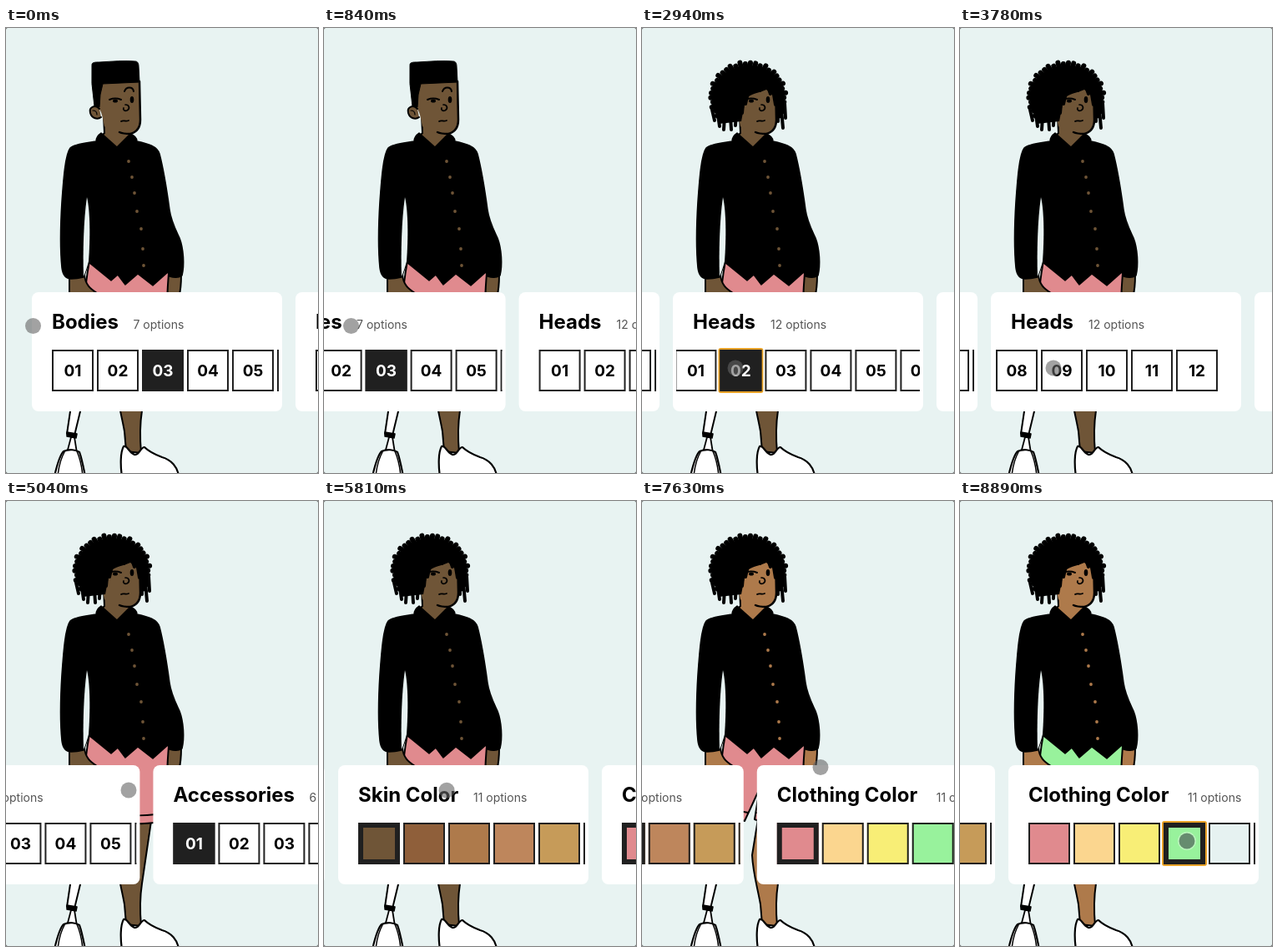
Animation of 374 by 534 pixels, one loop 8.96 s. Source, as an HTML page with a canvas:

```html
<!DOCTYPE html>
<html lang="en">
<head>
<meta charset="utf-8">
<title>Character builder</title>
<style>
  html, body { margin: 0; width: 100%; height: 100%; overflow: hidden; background: #e8f3f2; }
  canvas { display: block; width: 374px; height: 534px; }
</style>
</head>
<body>
<canvas id="stage"></canvas>
<script>
const W = 374, H = 534, LOOP = 8960;
const BG = '#e8f3f2', INK = '#202020', FONT = 'Inter, "Open Sans", sans-serif';
const HEAD_CLICK = 2450, SKIN_CLICK = 6230, CLOTH_CLICK = 8400;

const SKINS = ['#6f5537', '#8f5f3a', '#ae7a4b', '#be865c', '#c69b59', '#d5ad78',
  '#e0b990', '#e8c8a4', '#efd5b8', '#f4e0cb', '#f9ecdf'];
const CLOTHES = ['#e08a8e', '#fbd68f', '#f8ee76', '#98f29c', '#e6f2f1', '#9cc9f2',
  '#b6a4ec', '#e9a5dc', '#d9d9d9', '#777777', '#ffffff'];

const canvas = document.getElementById('stage');
const ctx = canvas.getContext('2d');
const scale = window.devicePixelRatio || 1;
canvas.width = W * scale;
canvas.height = H * scale;

// Timing: each key is [start, end, value reached at end]
const smooth = u => u * u * (3 - 2 * u);
const glide = u => smooth(1 - (1 - u) ** 1.6);
function track(t, from, keys, ease) {
  let value = from;
  for (const [start, end, to] of keys) {
    const u = Math.min(1, Math.max(0, (t - start) / (end - start)));
    value += (to - value) * ease(u);
  }
  return value;
}
const pageScroll = t => track(t, 0, [[350, 2100, 310], [4873, 5603, 962], [7203, 8103, 1237]], glide);
const headScroll = t => track(t, 0, [[2870, 3650, 396], [3800, 4500, 0]], glide);
const pointerX = t => track(t, 32.5, [[2170, 2440, 136], [2560, 2740, 112], [4450, 4780, 147],
  [5800, 6180, 174], [6510, 6950, 214], [8060, 8300, 272]], smooth);
const pointerY = t => track(t, 357.5, [[2170, 2440, 408], [4450, 4780, 347],
  [5800, 6180, 408], [6510, 6950, 319.5], [8060, 8300, 408]], smooth);

// Drawing helpers
function shape(d, fill, line, width = 2) {
  const path = new Path2D(d);
  if (fill) { ctx.fillStyle = fill; ctx.fill(path); }
  if (line) { ctx.strokeStyle = line; ctx.lineWidth = width; ctx.stroke(path); }
}
function box(x, y, w, h, r, fill) {
  ctx.fillStyle = fill;
  ctx.beginPath();
  ctx.roundRect(x, y, w, h, r);
  ctx.fill();
}
function frame(x, y, size, width, color) {
  ctx.strokeStyle = color;
  ctx.lineWidth = width;
  ctx.strokeRect(x + width / 2, y + width / 2, size - width, size - width);
}
function dot(x, y, r, fill) {
  ctx.fillStyle = fill;
  ctx.beginPath();
  ctx.arc(x, y, r, 0, Math.PI * 2);
  ctx.fill();
}
function text(str, x, y, font, color, align = 'left') {
  ctx.font = `${font} ${FONT}`;
  ctx.textAlign = align;
  ctx.fillStyle = color;
  ctx.fillText(str, x, y);
}

function drawLegs(skin, cloth) {
  // artificial leg
  shape('M98 385 L77 460 L73 487 L82 489 L89 460 L119 385Z', '#fff', '#000');
  shape('M78 491 L73 510 H85 L82 491Z', '#fff', '#000', 1.8);
  shape('M73 485 L85 487 L84 492 L73 490Z', '#000', '#000', 1.5);
  shape('M58 538 C61 525 64 513 69 508 C76 505 84 506 88 509 C91 517 93 528 95 538Z', '#fff', '#000', 2.2);
  shape('M70 509 C65 518 63 528 62 538 M85 508 C89 517 91 527 92 538', null, '#000', 1.5);
  // natural leg
  shape('M139 382 L132 425 C133 446 138 462 142 484 L144 508 L162 510 C160 488 161 472 163 459 L174 384Z', skin, '#000');
  shape('M139 538 C137 525 137 509 141 502 C145 500 147 509 154 512 C160 513 161 503 166 503 C171 508 179 512 187 515 C198 518 206 527 207 538Z', '#fff', '#000', 2.2);
  // shorts
  shape('M101 276 C95 300 93 340 91 376 L123 384 L141 345 L135 382 C148 388 163 388 178 386 C189 360 198 325 196 278Z', cloth, '#000');
  shape('M92 367 L127 374 M137 374 C149 379 164 378 180 376', null, '#000', 1.8);
}

function drawBody(skin) {
  // hands and neck
  shape('M76 296 V336 C84 344 98 336 109 318 C101 313 95 308 94 296Z', skin, '#000');
  shape('M195 294 C194 312 191 330 198 337 C207 335 210 314 210 296Z', skin, '#000');
  shape('M117 106 L118 126 L110 134 L132 148 L151 130 L147 112Z', skin, '#000');
  // shirt
  shape('M114 126 C111 128 108 131 108 136 C97 138 82 139 77 144 C71 152 69 180 67 208 C65 240 65 268 67 288' +
    ' C68 296 71 301 78 301 C84 301 89 300 93 299 C95 293 98 287 99 281 L126 303 L134 296 L143 308 L158 295 L176 309 L194 293' +
    ' L196 298 C202 300 207 300 211 297 C214 285 213 265 208 252 C203 241 198 232 196 218 C193 196 190 174 184 151' +
    ' C181 142 171 139 157 136 C157 132 154 129 149 127 L133 143 Z', '#000', '#000', 1.5);
  shape('M97 203 C101 220 101 252 99 280 C97 288 95 293 93 298 C92 270 93 230 97 203Z', BG);
  for (const [x, y] of [[147, 160], [151, 179], [154, 198], [157, 220], [162, 241], [164, 265], [165, 285]])
    dot(x, y, 1.9, skin);
}

function drawFace(skin, ear) {
  shape('M106 66 L107 94 C114 94 116 108 118 118 C128 126 138 128 149 127 C157 125 161 119 161 110 L160 64Z', skin);
  shape('M136 125 C140 127 145 127 149 127 C157 125 161 119 161 110 L160 64', null, '#000', 2.5);
  if (ear) {
    shape('M112 97 C107 91 99 95 101 102 C103 109 110 110 114 107', skin, '#000');
    shape('M104 99 C108 99 109 102 109 104', null, '#000', 1.2);
  }
  shape('M124 86 C129 84 133 84 138 86 M142 76 C144 70 152 70 153 76', null, '#000', 2);
  shape('M143 92 C148 92 149 97 145 99 C142 100 140 98 141 96', null, '#000', 1.7);
  shape('M138 112 C141 110 143 113 147 111', null, '#000', 1.8);
  ctx.fillStyle = '#000';
  for (const [x, y, rx, ry] of [[131, 87.5, 3, 2], [151, 86, 2.3, 4]]) {
    ctx.beginPath();
    ctx.ellipse(x, y, rx, ry, 0, 0, Math.PI * 2);
    ctx.fill();
  }
}

function drawFlatTop() {
  shape('M103 44 C103 41 107 41 112 41 C128 40 142 39 155 40 C158 40 159 43 159 46 L160 65 L116 67 L113 80 L112 95 L106 94 L103 67Z', '#000', '#000', 1);
}

function drawCurlsBehind() {
  for (let i = 0; i < 34; i++) {
    const a = 2.4 + i * 0.14, stretch = 1 + 0.035 * Math.sin(i * 2.6);
    const x = 127 + 44 * stretch * Math.cos(a), y = 82 + 40 * stretch * Math.sin(a);
    shape(`M127 82 L${x} ${y}`, null, '#000', 6);
  }
}

function drawCurlsFront() {
  shape('M84 92 C83 58 108 45 130 45 C154 45 171 64 171 102 L163 108 L160 86 C157 80 153 76 149 74' +
    ' C141 78 130 78 124 86 L119 112 L92 115Z', '#000');
  const locks = [[84, 98, 87, 111], [91, 104, 93, 118], [99, 106, 98, 122], [106, 106, 107, 122],
    [113, 100, 112, 117], [122, 80, 120, 102], [128, 74, 124, 91], [150, 68, 154, 79],
    [157, 74, 160, 92], [163, 90, 163, 112], [167, 98, 169, 120], [171, 90, 172, 108]];
  locks.forEach(([x1, y1, x2, y2]) => shape(`M${x1} ${y1} L${x2} ${y2}`, null, '#000', 4));
}

function drawFigure(t) {
  const skin = SKINS[t < SKIN_CLICK ? 0 : 2];
  const cloth = CLOTHES[t < CLOTH_CLICK ? 0 : 3];
  const curly = t >= HEAD_CLICK;
  ctx.lineCap = ctx.lineJoin = 'round';
  drawLegs(skin, cloth);
  if (curly) drawCurlsBehind();
  drawBody(skin);
  drawFace(skin, !curly);
  if (curly) drawCurlsFront(); else drawFlatTop();
  ctx.lineCap = 'butt';
  ctx.lineJoin = 'miter';
}

function drawCard(x, card) {
  box(x, 317, 300, 143, 8, '#fff');
  text(card.title, x + 24, 361, '700 24px', '#000');
  text(`${card.count} options`, x + card.labelX, 361, '400 14px', '#555');
  ctx.save();
  ctx.beginPath();
  ctx.rect(x + 4, 376, 292, 72);
  ctx.clip();
  for (let i = 0; i < card.count; i++) {
    const bx = x + 24 + 54 * i - (card.scroll || 0), by = 386;
    const on = i === card.selected;
    if (on && card.focus) box(bx - 2, by - 2, 54, 54, 3, '#e9a227');
    box(bx, by, 50, 50, 0, card.colors ? card.colors[i] : on ? INK : '#fff');
    frame(bx, by, 50, on && card.colors ? 6 : 2, INK);
    if (!card.colors)
      text(String(i + 1).padStart(2, '0'), bx + 25, 418, '700 19px', on ? '#fff' : '#000', 'center');
  }
  ctx.restore();
}

function drawPointer(t) {
  const x = pointerX(t), y = pointerY(t);
  const pressed = [[HEAD_CLICK, 2560], [SKIN_CLICK, 6380], [CLOTH_CLICK, LOOP]].some(([a, b]) => t >= a && t < b);
  if (pressed) dot(x, y, 11, 'rgba(255,255,255,.35)');
  dot(x, y, 9.5, pressed ? 'rgba(45,70,58,.6)' : 'rgba(100,100,100,.6)');
}

function draw(t) {
  ctx.setTransform(scale, 0, 0, scale, 0, 0);
  box(0, 0, W, H, 0, '#444');
  box(0, 0, W, H, 2, BG);
  drawFigure(t);
  const cards = [
    { title: 'Bodies', count: 7, labelX: 121.5, selected: 2 },
    { title: 'Heads', count: 12, labelX: 117, selected: t < HEAD_CLICK ? 3 : 1,
      focus: t >= HEAD_CLICK, scroll: headScroll(t) },
    { title: 'Accessories', count: 6, labelX: 187, selected: 0 },
    { title: 'Skin Color', count: 11, labelX: 162, colors: SKINS, selected: t < SKIN_CLICK ? 0 : 2,
      focus: t >= SKIN_CLICK && t < 6950 },
    { title: 'Clothing Color', count: 11, labelX: 215, colors: CLOTHES, selected: t < CLOTH_CLICK ? 0 : 3,
      focus: t >= CLOTH_CLICK }
  ];
  const left = 31 - pageScroll(t);
  cards.forEach((card, i) => drawCard(left + 316 * i, card));
  drawPointer(t);
}

const begin = performance.now();
function tick() {
  draw((performance.now() - begin) % LOOP);
  requestAnimationFrame(tick);
}
tick();
</script>
</body>
</html>
```
